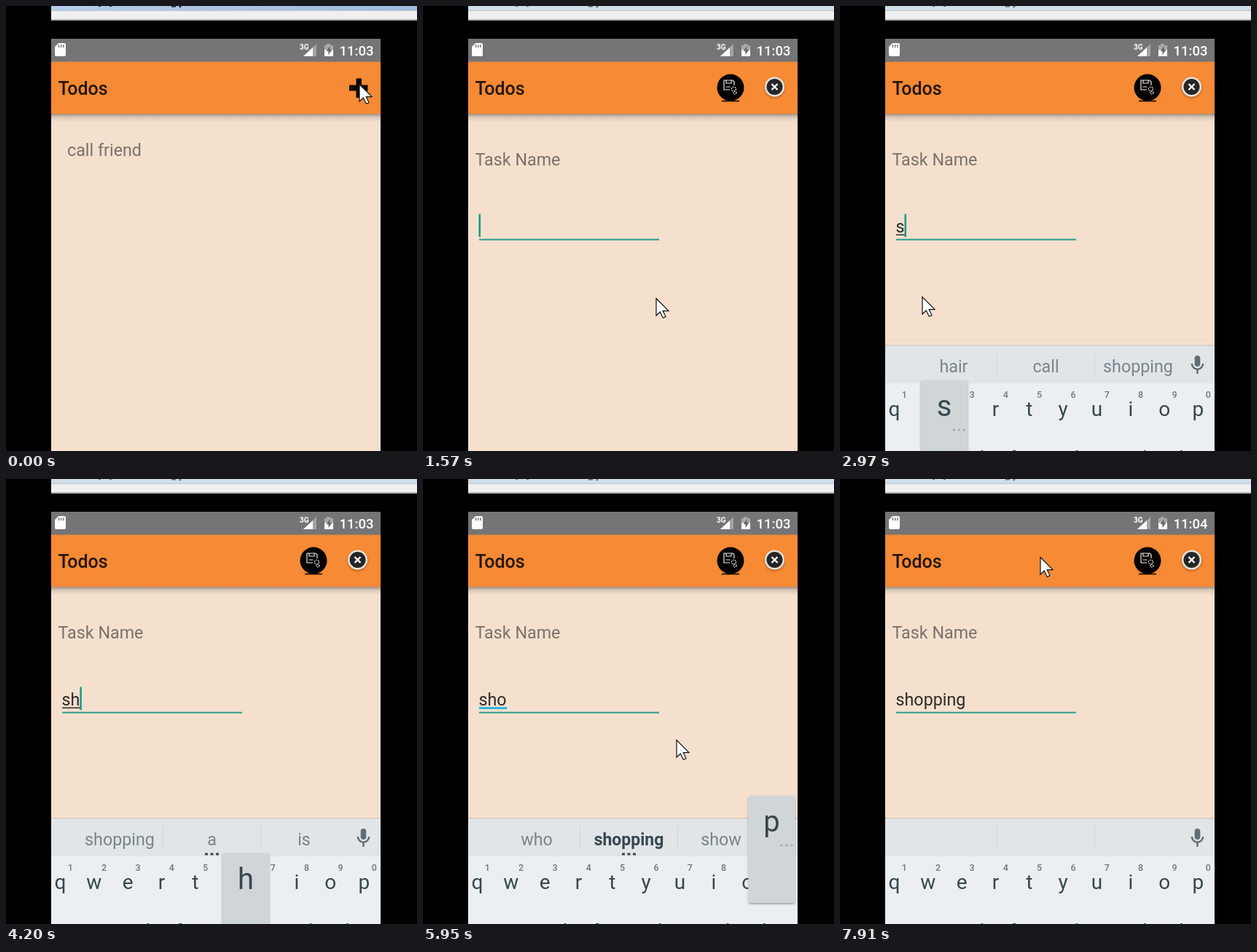
An HTML page for the animation above (8000 ms loop, 564 by 611 pixels).

```html
<!DOCTYPE html>
<html lang="en">
<head>
<meta charset="utf-8">
<title>Todos</title>
<style>
  html, body { margin: 0; width: 100%; height: 100%; overflow: hidden; background: #000; }
  svg { display: block; width: 564px; height: 611px; font-family: Roboto, sans-serif; }
  text { white-space: pre; }
  .label { font-size: 23.3px; fill: #7b716a; }
  .hint { font-size: 12.5px; font-weight: 500; fill: #6d787e; text-anchor: middle; }
  .key { font-size: 28px; fill: #37474f; text-anchor: middle; }
  .word { font-size: 23.3px; fill: #78858c; text-anchor: middle; }
  .word.strong { font-size: 23px; font-weight: 700; fill: #37474f; }
</style>
</head>
<body>
<svg viewBox="0 0 564 611">
  <defs>
    <linearGradient id="shade" x1="0" y1="0" x2="0" y2="1">
      <stop offset="0" stop-color="#000" stop-opacity=".36"/>
      <stop offset=".4" stop-color="#000" stop-opacity=".12"/>
      <stop offset="1" stop-color="#000" stop-opacity="0"/>
    </linearGradient>
    <linearGradient id="glass">
      <stop offset="0" stop-color="#b4cde8"/>
      <stop offset="1" stop-color="#9dbcdd"/>
    </linearGradient>
    <filter id="soft" x="-20%" y="-20%" width="140%" height="140%">
      <feDropShadow dx="0" dy="1.5" stdDeviation="1.5" flood-opacity=".35"/>
    </filter>
  </defs>

  <!-- window edge above the device -->
  <rect x="62" width="502" height="20" fill="#f0f0f0"/>
  <rect id="frame" x="62" width="502" height="6" fill="url(#glass)"/>
  <rect x="62" y="6" width="502" height="1" fill="#c3c8ce"/>
  <rect x="62" y="18" width="502" height="2" fill="#b3b3b3"/>
  <path id="caption" d="M127 0h3M142 0h3M227 .5h6M240 0l-2 2" stroke="#1c1c1c" stroke-width="2"/>

  <!-- device screen -->
  <rect x="62" y="45" width="452" height="566" fill="#f5e0ce"/>
  <rect x="62" y="148" width="452" height="11" fill="url(#shade)"/>
  <rect x="62" y="76" width="452" height="72" fill="#f68a35"/>
  <rect x="62" y="45" width="452" height="31.5" fill="#757575"/>
  <path d="M72 51h8q2 0 2 2v14q0 2-2 2H69q-2 0-2-2V56z" fill="#fff"/>
  <path d="M72.5 53v4M75.7 53v4M79 53v4" stroke="#757575" stroke-width="1.5"/>
  <text x="403" y="59.5" font-size="10" font-weight="700" fill="#fff">3G</text>
  <path d="M426 52v17h-18z" fill="#a3a3a3"/>
  <path d="M421 57v12h-13z" fill="#fff"/>
  <path d="M437 54h3v-2h5v2h4v8h-12z" fill="#a9a9a9"/>
  <path d="M437 60h12v9h-12z" fill="#fff"/>
  <path d="M444.5 55l-5 7h3v5l5-7h-3z" fill="#666"/>
  <text id="clock" x="457.5" y="68" font-size="18.5" font-weight="500" fill="#fff"></text>
  <text x="71.5" y="122" font-size="25" font-weight="500" fill="#24150a">Todos</text>

  <g id="list">
    <path d="M471 108.5h9.500v-9h7.500v9h8.500v8h-8.500v9.500h-7.500v-9.500h-9.500z" fill="#0a0603"/>
    <text class="label" x="84" y="206">call friend</text>
  </g>

  <g id="form">
    <circle cx="422" cy="112" r="18.5" fill="#050302"/>
    <path d="M410 130.500h24" stroke="#050302" stroke-width="1.5"/>
    <g fill="none" stroke="#e8e8e8" stroke-width="1.2">
      <path d="M421 115h-8v-13h12l2 2v5M416 102v4h7v-4M415.500 111h6"/>
      <circle cx="426.500" cy="114" r="3" stroke-dasharray="2 1"/>
      <circle cx="428" cy="119" r="2" stroke-dasharray="1.5 1"/>
    </g>
    <g filter="url(#soft)">
      <circle cx="482.500" cy="111" r="13.500" fill="#e6e1dc"/>
      <circle cx="482.500" cy="111" r="11" fill="#262626"/>
    </g>
    <path d="M478.500 107l8 8m0-8l-8 8" stroke="#fff" stroke-width="2.400"/>
    <text class="label" x="71.500" y="219">Task Name</text>
    <rect x="77" y="319.700" width="247" height="2" fill="#2a9d8f"/>
    <text id="entry" x="76.500" y="311" font-size="23.300" fill="#2e2a27"></text>
    <rect id="mark" x="77"/>
    <rect id="caret" y="285.500" width="2.500" height="31.500" fill="#119988"/>
  </g>

  <g id="board">
    <rect x="62" y="465" width="452" height="2" fill="#d9cfc6"/>
    <rect x="62" y="467" width="452" height="52" fill="#e1e5e8"/>
    <rect x="62" y="518" width="452" height="240" fill="#ebeff2"/>
    <path d="M215.500 477v32M349.500 477v32" stroke="#cfd5d8"/>
    <g id="words"></g>
    <path id="dots" d="M273 515h4m3.500 0h4m3.500 0h4" stroke="#37474f" stroke-width="3"/>
    <rect x="486.700" y="480" width="7.600" height="15" rx="3.800" fill="#5f6d75"/>
    <path d="M482.800 491a7.700 7.700 0 0 0 15.400 0M490.500 499v6" fill="none" stroke="#5f6d75" stroke-width="2.400"/>
    <g id="keys"></g>
    <g id="popup">
      <rect x="-32" width="64" height="147" rx="3" fill="#d0d5d8" filter="url(#soft)"/>
      <text id="pressed" y="49" font-size="40" fill="#37474f" text-anchor="middle"></text>
      <path id="more" d="M12 68h3m4 0h3m4 0h3" stroke="#a0abb1" stroke-width="2.500"/>
    </g>
  </g>

  <path id="mouse" d="M0 .5V24l5.300-5 4 8.300 3.700-1.700-3.800-8H17z" fill="#fff" stroke="#111" stroke-width="1.200"/>
</svg>
<script>
const LOOP = 8000;
const $ = id => document.getElementById(id);
const el = Object.fromEntries([...document.querySelectorAll('[id]')].map(n => [n.id, n]));

// Each row: start time, then the values held until the next row.
const mouseSteps = [
  [0, 485, 107], [1270, 470, 140], [1420, 400, 270], [1570, 320, 401],
  [2170, 260, 480], [2320, 175, 585], [2470, 144, 640], [2820, 120, 480],
  [2970, 113, 399], [3280, 125, 412], [3430, 220, 500], [3580, 300, 588],
  [3730, 330, 640], [4440, 345, 598], [4580, 400, 575], [4710, 440, 560],
  [5280, 460, 560], [5560, 490, 556], [5830, 400, 440], [5950, 348, 358],
  [6350, 420, 450], [6480, 480, 553], [6600, 430, 530], [6730, 330, 500],
  [6880, 300, 490], [7470, 298, 460], [7620, 290, 330], [7760, 280, 190], [7910, 275, 107]
];
const entrySteps = [
  [0, '', 1], [1870, '', 0], [2320, '', 1], [2820, 's', 1], [3430, 's', 0], [3880, 's', 1],
  [4050, 'sh', 1], [4440, 'sh', 0], [4710, 'sh', 1], [5150, 'sho', 1], [5560, 'sho', 0],
  [5830, 'sho', 1], [5950, 'sho', 0], [6070, 'shop', 1], [6600, 'shopp', 1], [6880, 'shopp', 0],
  [7180, 'shopping', 1], [7620, 'shopping', 0]
];
const wordSteps = [
  [0, 'hair call shopping'], [3120, 'shopping a is'], [4320, 'who shopping show'],
  [6350, 'shop shopping shoppers'], [7320, '']
];
const popupSteps = [
  [0, ''], [2820, 's', 143, 514], [3120, ''], [4050, 'h', 329, 514], [4320, ''],
  [5020, 'o', 445, 435], [5280, ''], [5830, 'p', 478.5, 435], [6070, ''],
  [6480, 'p', 478.5, 435], [6730, '']
];
const formSteps = [[0, 0], [1120, .5], [1270, 1]];
const boardSteps = [[0, 150], [1720, 95], [1870, 30], [2020, 0]];

const at = (steps, t) => steps.findLast(s => s[0] <= t).slice(1);
const set = (node, attrs) => Object.entries(attrs).forEach(([k, v]) => node.setAttribute(k, v));
const show = (node, on) => node.setAttribute('visibility', on ? 'visible' : 'hidden');
const move = (node, x, y) => node.setAttribute('transform', `translate(${x} ${y})`);
const label = (cls, x, y, s) => `<text class="${cls}" x="${x}" y="${y}">${s}</text>`;

const row = (letters, x, y) => [...letters].map((c, i) => label('key', x + i * 46.33, y, c)).join('');
el.keys.innerHTML = row('qwertyuiop', 74.5, 563) + row('asdfghjkl', 97.7, 631) +
  [...'1234567890'].map((c, i) => label('hint', 88.3 + i * 46.33, 538, c)).join('');

function drawEntry(t) {
  const [text, blink] = at(entrySteps, t);
  el.entry.textContent = text;
  const width = text ? el.entry.getComputedTextLength() : 0;
  const fix = text.length > 2;
  set(el.mark, { y: fix ? 313 : 313.5, width, height: fix ? 3 : 1.5, fill: fix ? '#33b5e5' : '#2e2a27' });
  show(el.mark, text && text !== 'shopping');
  el.caret.setAttribute('x', 76.5 + width);
  show(el.caret, blink);
}

function drawBoard(t) {
  move(el.board, 0, at(boardSteps, t)[0]);
  const [line] = at(wordSteps, t);
  const strong = t >= 5020 && line;
  el.words.innerHTML = line.split(' ').map((w, i) =>
    label(i === 1 && strong ? 'word strong' : 'word', 156 + i * 126.5, 503, w)).join('');
  show(el.dots, t >= 3120 && line);

  const [key, x, y] = at(popupSteps, t);
  el.popup.style.display = key ? '' : 'none';
  if (!key) return;
  move(el.popup, x, y);
  el.pressed.textContent = key;
  show(el.more, key !== 'h');
}

function draw(t) {
  const active = t < 140;
  const [form] = at(formSteps, t);
  el.frame.setAttribute('fill', active ? 'url(#glass)' : '#cfdde9');
  el.caption.setAttribute('opacity', active ? 1 : .6);
  el.clock.textContent = t < 6600 ? '11:03' : '11:04';
  el.list.style.opacity = 1 - form;
  el.form.style.opacity = form;
  drawEntry(t);
  drawBoard(t);
  move(el.mouse, ...at(mouseSteps, t));
}

const start = performance.now();
function tick() {
  draw((performance.now() - start) % LOOP);
  requestAnimationFrame(tick);
}
tick();
</script>
</body>
</html>
```
